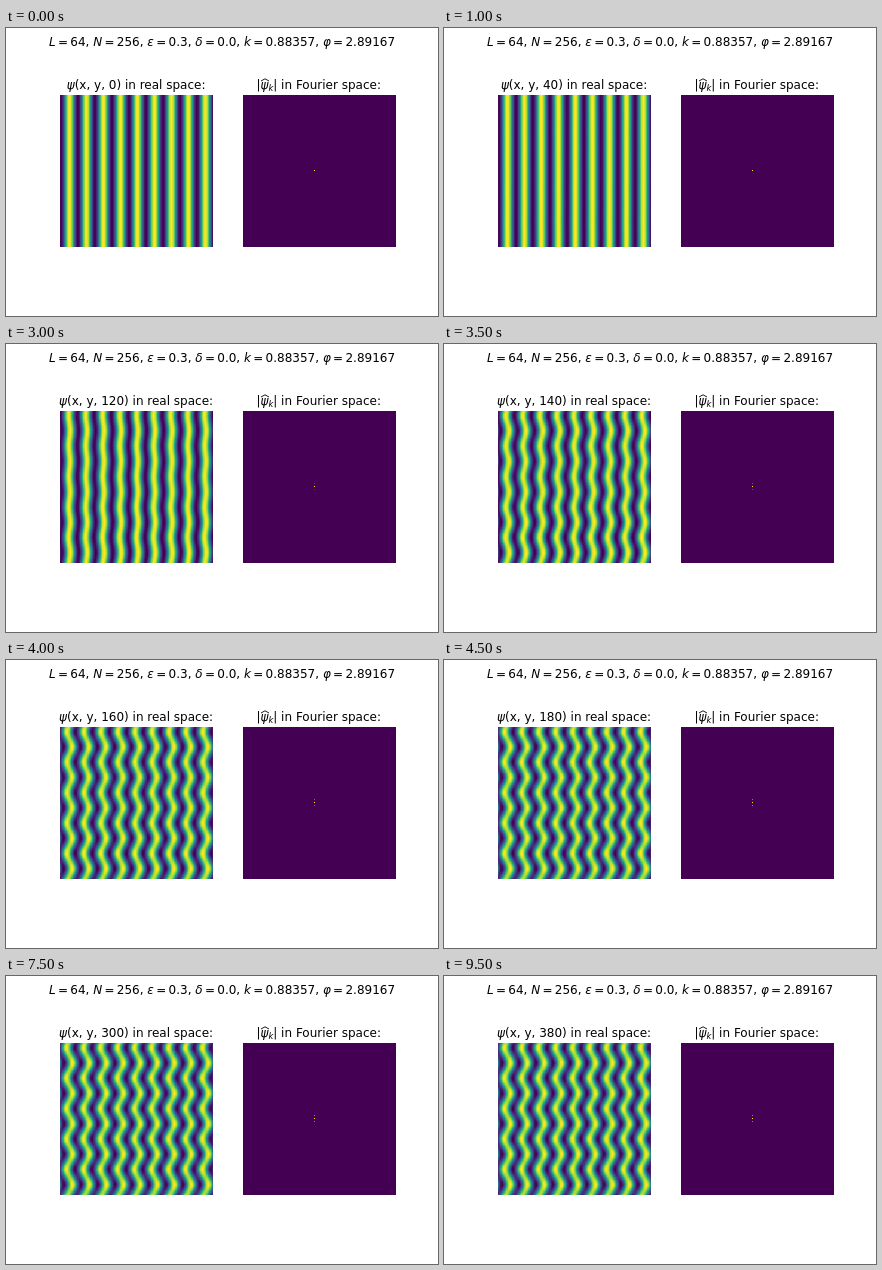
Animation of 432x288 px, one loop 10000 ms. Source, as an HTML page with a canvas:

```html
<!DOCTYPE html>
<html lang="en">
<head>
<meta charset="utf-8">
<style>
  html, body { margin: 0; width: 100%; height: 100%; overflow: hidden; background: #fff; }
  canvas, svg { position: absolute; left: 0; top: 0; }
  text { font: 12px "DejaVu Sans", sans-serif; text-anchor: middle; white-space: pre; }
  i, .m { font-style: oblique; }
</style>
</head>
<body>
<canvas id="plot" width="432" height="288"></canvas>
<svg width="432" height="288">
  <text id="params" x="216" y="18"></text>
  <text x="130.1" y="61"><tspan class="m">ψ</tspan><tspan id="time">(x, y, 0) in real space:</tspan></text>
  <text x="312.7" y="61">|<tspan class="m">ψ</tspan><tspan class="m" dy="2" font-size="8.4" style="font-size:8.4px">k</tspan><tspan dy="-2">| in Fourier space:</tspan></text>
  <path d="M255 53L259 50.8L263 53" fill="none" stroke="#000" stroke-width=".9"/>
</svg>
<script>
const W = 153, H = 152, TOP = 67, LEFT = 54, RIGHT = 237, N = 256;
const TAU = 2 * Math.PI, PHASE = 2.89167;
const ctx = document.getElementById('plot').getContext('2d');
const timeLabel = document.getElementById('time');
const image = ctx.createImageData(W, H);

const params = { L: '64', N: '256', ε: '0.3', δ: '0.0', k: '0.88357', φ: '2.89167' };
document.getElementById('params').innerHTML = Object.entries(params).map(([name, value]) =>
  `<tspan class="m">${name}</tspan><tspan dx="2.3">=</tspan><tspan dx="2.3">${value}</tspan>`
).join('<tspan>, </tspan>');

// Viridis colour map
const stops = [[68, 1, 84], [71, 44, 122], [59, 81, 139], [44, 113, 142], [33, 144, 141],
  [39, 173, 129], [92, 200, 99], [170, 220, 50], [253, 231, 37]];
function viridis(v) {
  const p = Math.max(0, Math.min(1, v)) * 8, i = Math.min(7, Math.floor(p));
  return stops[i].map((c, j) => Math.round(c + (stops[i + 1][j] - c) * (p - i)));
}

// Zigzag bend in radians: exponential growth that saturates
const bend = t => t ? 1.1 / Math.sqrt(1 + 2.5 * Math.exp(-0.09 * (t - 140))) : 0;

function drawStripes(a) {
  const swell = 0.32 * (a / 1.1) ** 2;
  const uneven = 0.25 * (1 - a / 1.1);
  for (let y = 0; y < H; y++) {
    const v = Math.floor((y + 0.5) * N / H) / N;
    const wave = -Math.cos(TAU * 5 * (v - 4.5 / H)) * (1 + uneven * Math.cos(TAU * (v - 0.87)));
    const size = (1 + swell * wave * wave) / (1 + swell);
    for (let x = 0; x < W; x++) {
      const u = Math.floor((x + 0.5) * N / W) / N;
      const psi = size * Math.cos(TAU * 9 * u + PHASE - a * wave);
      image.data.set([...viridis((psi + 1) / 2), 255], (y * W + x) * 4);
    }
  }
  ctx.putImageData(image, LEFT, TOP);
}

function drawSpectrum(a) {
  const dot = (y, v) => {
    ctx.fillStyle = `rgb(${viridis(v)})`;
    ctx.fillRect(308, y, 1, 1);
  };
  ctx.fillStyle = `rgb(${viridis(0)})`;
  ctx.fillRect(RIGHT, TOP, W, H);
  dot(142, 1);
  const side = 0.5 * a * (1 + 0.15 * a * a);
  dot(139, side);
  dot(145, side);
}

let shown = -1;
function frame(now) {
  const step = Math.floor(now % 10000 / 500);
  if (step !== shown) {
    shown = step;
    const t = step * 20, a = bend(t);
    timeLabel.textContent = `(x, y, ${t}) in real space:`;
    drawStripes(a);
    drawSpectrum(a);
  }
  requestAnimationFrame(frame);
}
frame(performance.now());
</script>
</body>
</html>
```
